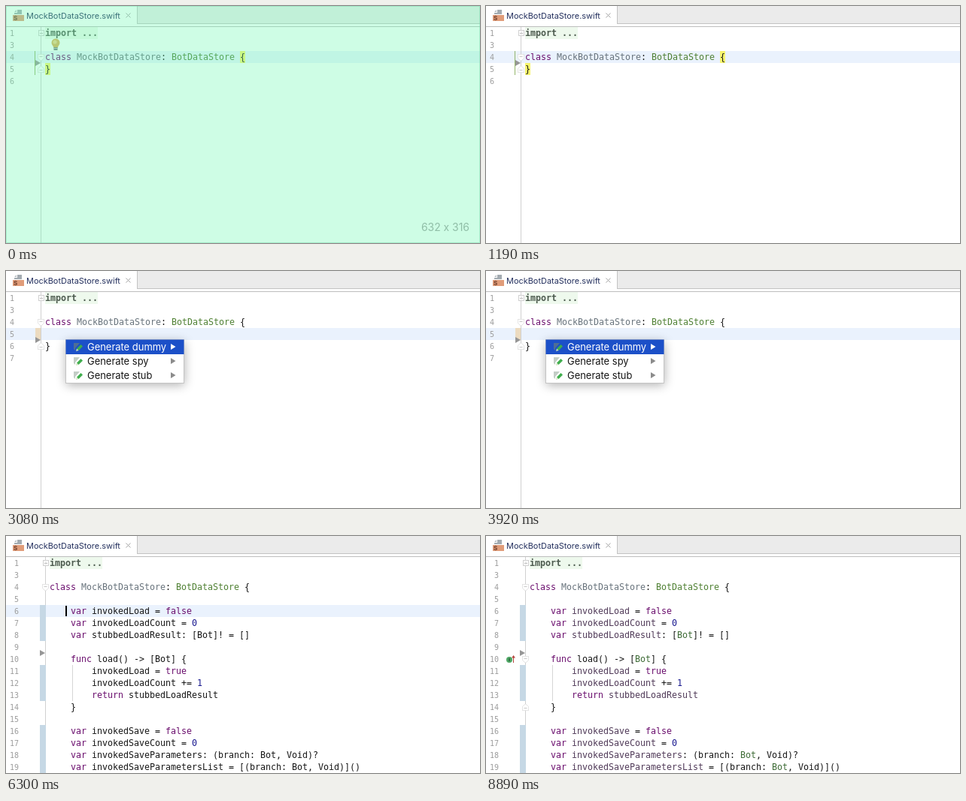
Recreate the animation shown at these times as an HTML page with a canvas. Size 630 px wide and 316 px high, loop 9030 ms.

```html
<!DOCTYPE html>
<html lang="en">
<head>
<meta charset="utf-8">
<title>Code generation</title>
<style>
html, body { margin: 0; width: 100%; height: 100%; overflow: hidden; background: #fff; }
canvas { display: block; width: 630px; height: 316px; }
</style>
</head>
<body>
<canvas id="stage" width="630" height="316"></canvas>
<script>
const ctx = document.getElementById('stage').getContext('2d');
const LOOP = 9030, STEP = 70;
const MONO = '"DejaVu Sans Mono", monospace';
const CODE = '11.63px ' + MONO;
const UI = 'Inter, sans-serif';
const CHAR = 7, ROW = 16;

// Moments at which the picture changes, in ms
const T = {
  clear: 70, still: 1050, hide: 1190, enter: 1960, bar: 2030, calm: 2100,
  menu: 3080, pick: 3990, close: 4970, closed: 5110,
  insert: 5880, leave: 6370, analyse: 7490
};

const CLASS_LINE = 'class MockBotDataStore: BotDataStore {';
const BODY = [
  '',
  '    var invokedLoad = false',
  '    var invokedLoadCount = 0',
  '    var stubbedLoadResult: [Bot]! = []',
  '',
  '    func load() -> [Bot] {',
  '        invokedLoad = true',
  '        invokedLoadCount += 1',
  '        return stubbedLoadResult',
  '    }',
  '',
  '    var invokedSave = false',
  '    var invokedSaveCount = 0',
  '    var invokedSaveParameters: (branch: Bot, Void)?',
  '    var invokedSaveParametersList = [(branch: Bot, Void)]()'
];

function box(x, y, w, h, color) {
  ctx.fillStyle = color;
  ctx.fillRect(x, y, w, h);
}

function text(str, x, y, font, color, align = 'left') {
  ctx.font = font;
  ctx.fillStyle = color;
  ctx.textAlign = align;
  ctx.fillText(str, x, y);
}

function shape(points, fill, stroke, width = 1) {
  ctx.beginPath();
  points.forEach(([x, y], i) => i ? ctx.lineTo(x, y) : ctx.moveTo(x, y));
  ctx.closePath();
  if (stroke) {
    ctx.strokeStyle = stroke;
    ctx.lineWidth = width;
    ctx.stroke();
  }
  if (fill) {
    ctx.fillStyle = fill;
    ctx.fill();
  }
}

function line(x1, y1, x2, y2, color, width = 1) {
  ctx.beginPath();
  ctx.moveTo(x1, y1);
  ctx.lineTo(x2, y2);
  ctx.strokeStyle = color;
  ctx.lineWidth = width;
  ctx.stroke();
}

function disc(x, y, r, color) {
  ctx.beginPath();
  ctx.arc(x, y, r, 0, Math.PI * 2);
  ctx.fillStyle = color;
  ctx.fill();
}

function tokenColor(word, analysed) {
  if (/^(class|var|func|return|true|false)$/.test(word)) return '#6b0f6e';
  if (/^\d+$/.test(word)) return '#1c1c90';
  if (word === 'MockBotDataStore') return '#68737c';
  if (word === 'BotDataStore') return '#4f8033';
  if (analysed && word === 'Bot') return '#3d6b35';
  if (analysed && /^(invoked|stubbed)/.test(word)) return '#503a58';
  return '#161616';
}

function code(str, x, y, analysed) {
  for (const m of str.matchAll(/\w+|[^\w\s]+/g)) {
    text(m[0], x + m.index * CHAR, y, CODE, tokenColor(m[0], analysed));
  }
}

function fileIcon() {
  shape([[15, 5], [21, 5], [21, 11], [11, 11], [11, 9], [15, 9]], '#a3abb1');
  shape([[11, 8], [14, 5], [14, 8]], '#b9c0c5');
  box(9, 12, 15, 8, '#e09c79');
  text('S', 10, 19, 'bold 8px ' + UI, '#6c3b28');
}

function header() {
  box(0, 0, 630, 24, '#ebebeb');
  box(0, 23, 630, 1, '#c3c3c3');
  box(0, 0, 174, 27, '#fff');
  box(174, 0, 1, 24, '#c3c3c3');
  box(0, 27, 630, 1, '#bdbdbd');
  fileIcon();
  text('MockBotDataStore.swift', 27, 16.5, '10.95px ' + UI, '#24305e');
  line(159.5, 9.5, 165.5, 15.5, '#a5a5a5');
  line(165.5, 9.5, 159.5, 15.5, '#a5a5a5');
}

function foldPlus(x, y) {
  box(x - 3, y - 4, 8, 8, '#cfcfcf');
  box(x - 2, y - 3, 6, 6, '#fff');
  box(x - 1, y, 4, 1, '#bcbcbc');
  box(x + 0.5, y - 2, 1, 4, '#d4d4d4');
}

// dir is 1 for an opening marker, -1 for a closing one
function foldEnd(x, y, dir) {
  const p = (dx, dy) => [x + 0.5 + dx, y + 0.5 + dy * dir];
  shape([p(-4, -4), p(4, -4), p(4, 1), p(0, 4.5), p(-4, 1)], '#fff', '#cbcbcb');
  line(...p(-2, -1), ...p(2, -1), '#c6c6c6');
}

function runMark(x, y) {
  shape([[x, y - 4], [x + 7, y], [x, y + 4]], '#969696');
}

function bulb(x, y) {
  disc(x, y - 1, 5.5, '#dcae55');
  shape([[x - 4, y + 2], [x + 4, y + 2], [x + 2.5, y + 6], [x - 2.5, y + 6]], '#dcae55');
  disc(x - 1, y - 2, 2.6, '#f0cf85');
  box(x - 2.5, y + 5, 5, 4, '#747b80');
  box(x - 2, y + 6, 4, 1, '#b5babd');
}

function arrow(x, y) {
  const path = [[0, 0], [0, 13], [3, 10.3], [5, 15], [7.2, 14], [5.2, 9.5], [9, 9.5]];
  ctx.lineJoin = 'round';
  shape(path.map(([a, b]) => [x + a, y + b]), '#000', '#fff', 1.6);
  ctx.lineJoin = 'miter';
}

function overrideIcon(x, y) {
  disc(x, y, 4, '#4fa765');
  box(x - 0.5, y - 2, 1, 4, '#173f22');
  line(x + 5.5, y + 4, x + 5.5, y - 4, '#b5453d');
  shape([[x + 3, y - 2.5], [x + 5.5, y - 6], [x + 8, y - 2.5]], '#b5453d');
}

function pencil(x, y, on) {
  shape([[x + 1, y + 1], [x + 9, y + 1], [x + 3, y + 8], [x + 3, y + 11], [x + 1, y + 9]], on ? '#4f6f94' : '#c3cdc6');
  shape([[x + 10.5, y + 3], [x + 13, y + 5.5], [x + 7.5, y + 11], [x + 5, y + 8.5]], '#3fae4d');
  shape([[x + 5, y + 8.5], [x + 7.5, y + 11], [x + 4, y + 12]], '#cfe3bd');
}

function menu(selected, alpha) {
  ctx.save();
  ctx.globalAlpha = alpha;
  ctx.save();
  ctx.shadowColor = 'rgba(0,0,0,.32)';
  ctx.shadowBlur = 13;
  ctx.shadowOffsetY = 3;
  box(80, 92, 157, 57, '#fff');
  ctx.restore();
  ctx.strokeStyle = '#c4c4c4';
  ctx.lineWidth = 1;
  ctx.strokeRect(79.5, 91.5, 157, 58);
  ['dummy', 'spy', 'stub'].forEach((kind, i) => {
    const on = i === selected, y = 92 + i * 19;
    if (on) box(79.5, y - 0.5, 157, 19.5, '#1c50c8');
    pencil(89, y + 3, on);
    text('Generate ' + kind, 108, y + 14, '12.95px ' + UI, on ? '#fff' : '#151515');
    shape([[219, y + 5], [225.5, y + 9], [219, y + 13]], on ? '#fff' : '#8b8b8b');
  });
  ctx.restore();
}

function numbers(list, right) {
  list.forEach((n, i) => text(n, right, 40 + i * ROW, '10px ' + MONO, '#9d9d9d', 'right'));
}

function importLine(x) {
  box(x, 28, 70, 16, '#eef9ed');
  text('import ...', x, 40, 'bold ' + CODE, '#4c5a4e');
}

function shortFile(t) {
  const opened = t >= T.enter, lit = t < T.calm;
  const end = opened ? 100 : 84;
  box(0, opened ? 76 : 60, 630, 16, '#eaf2fd');
  if (t >= T.bar) box(39, 76, 7, 16, '#ecdbc0');
  box(46, 28, 1, 288, '#d0d0d0');
  if (lit) {
    box(38, 60, 1, end - 52, '#93b56a');
    box(311, 60, 7, 16, '#f7f56e');
    box(52, end - 8, 7, 16, '#f7f56e');
  }
  numbers(opened ? [1, 3, 4, 5, 6, 7] : [1, 3, 4, 5, 6], 11);
  importLine(52);
  code(CLASS_LINE, 52, 72);
  code('}', 52, end + 4);
  foldPlus(46, 36);
  foldEnd(46, 68, 1);
  foldEnd(46, end, -1);
  runMark(39, end - 8);
  if (t < T.hide) bulb(66, 50);
  if (opened && t < T.menu) box(79, 77, 2, 14, '#000');
}

function fullFile(t) {
  const analysed = t >= T.analyse;
  if (t < T.leave) box(0, 92, 630, 16, '#eaf2fd');
  box(52, 28, 1, 288, '#d0d0d0');
  for (const [y, h] of [[92, 48], [172, 48], [252, 64]]) box(45, y, 8, h, '#c6d8e5');
  box(88, 172, 1, 48, '#d6d6d6');
  numbers([1, ...Array.from({ length: 17 }, (_, i) => i + 3)], 17);
  importLine(58);
  code(CLASS_LINE, 58, 72);
  BODY.forEach((str, i) => code(str, 58, 88 + i * ROW, analysed));
  foldPlus(52, 36);
  foldEnd(52, 68, 1);
  runMark(45, 156);
  if (analysed) {
    foldEnd(52, 164, 1);
    foldEnd(52, 228, -1);
    overrideIcon(31, 165);
  }
  if (t < T.leave) box(79, 93, 2, 14, '#000');
}

function captureTint() {
  box(0, 0, 630, 316, 'rgba(106,249,176,.33)');
  ctx.strokeStyle = 'rgba(110,215,165,.4)';
  ctx.lineWidth = 1;
  ctx.strokeRect(0.5, 0.5, 629, 315);
  text('632 x 316', 616, 300, '13.95px ' + UI, '#8fbda6', 'right');
}

function draw(t) {
  box(0, 0, 630, 316, '#fff');
  header();
  if (t < T.insert) shortFile(t);
  else fullFile(t);

  if (t >= T.clear && t < T.hide) {
    const u = Math.min(1, (t - T.clear) / (T.still - T.clear));
    const k = u * u * (3 - 2 * u);
    arrow(511 - 203 * k, 230 - 197 * k);
  }
  if (t >= T.menu && t < T.closed) {
    const alpha = t < T.close ? 1 : 0.45 * (1 - (t - T.close) / (T.closed - T.close));
    menu(t < T.pick ? 0 : 1, alpha);
  }
  if (t < T.clear) captureTint();
}

const start = performance.now();
function tick() {
  const t = (performance.now() - start) % LOOP;
  draw(Math.floor(t / STEP) * STEP);
  requestAnimationFrame(tick);
}
tick();
</script>
</body>
</html>
```
